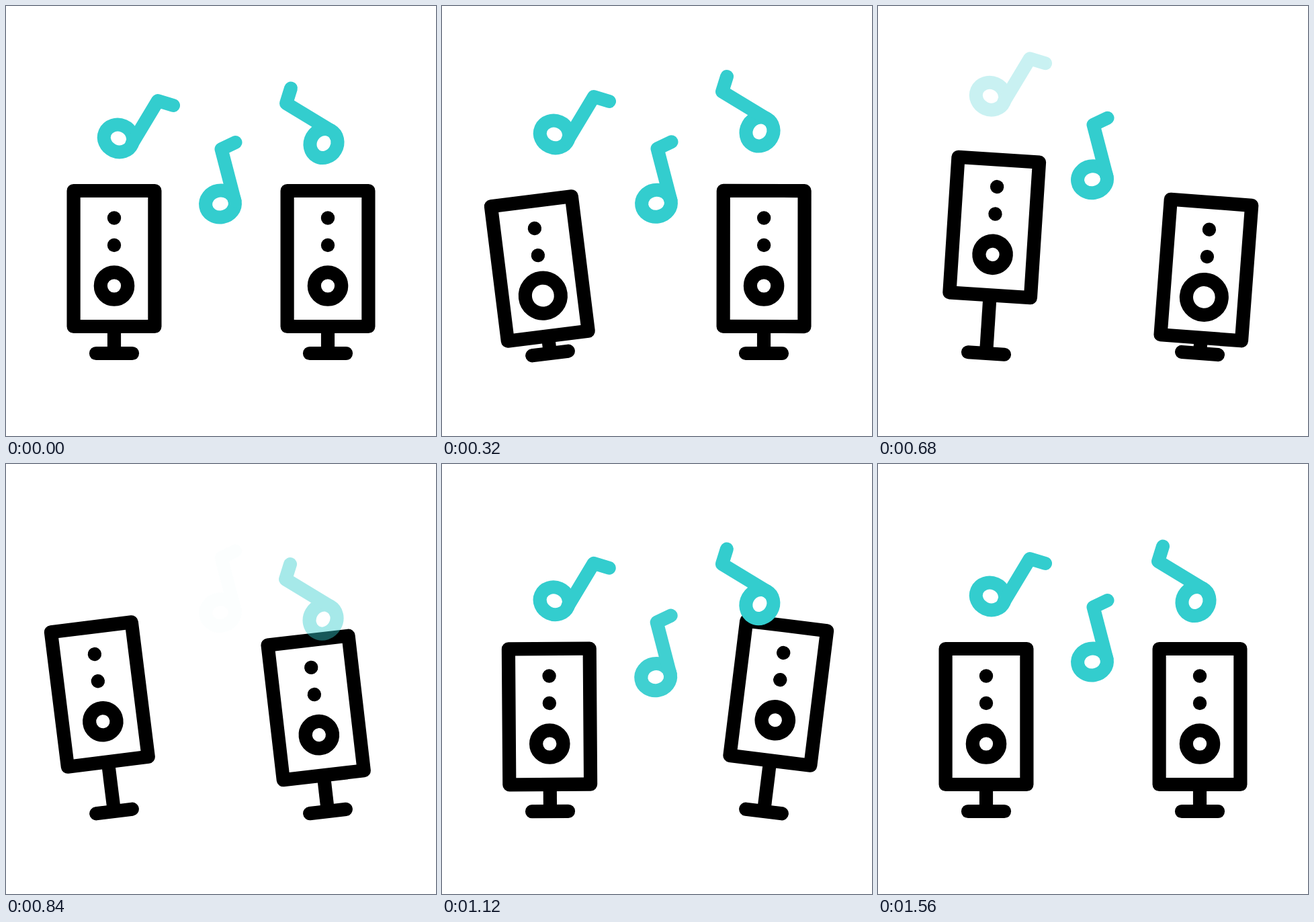
Recreate the animation shown at these times as an HTML page. Size 640x640 px, loop 1600 ms.

```html
<!DOCTYPE html>
<html lang="en">
<head>
<meta charset="utf-8">
<title>Dancing speakers</title>
<style>
  html, body { margin: 0; height: 100%; overflow: hidden; background: #fff; }
  svg { display: block; width: 100vw; height: 100vh; }
  .line { fill: none; stroke: #000; stroke-width: 20.2; stroke-linejoin: round; }
  .note { fill: none; stroke: #33cdce; stroke-width: 20; stroke-linecap: round; stroke-linejoin: round; }
  .note ellipse { fill: #fff; }
</style>
</head>
<body>
<svg viewBox="0 0 640 640">
  <defs>
    <g id="cabinet">
      <rect class="line" x="-60.4" y="-242" width="120.8" height="202"/>
      <circle cy="-201.5" r="10.2"/>
      <circle cy="-161" r="10.2"/>
    </g>
  </defs>
  <g id="stage"></g>
</svg>
<script>
const LOOP = 1600;
const stage = document.getElementById('stage');

// Speaker tracks: [ms, value] keys, eased between neighbours
const TILT = [[20, 0], [255, 7.1], [317, 7.1], [577, -7], [609, -7], [839, 7.1], [892, 7.1], [1160, 0]];
const DROP = [[45, 0], [422, 17], [685, -47], [735, -47], [1045, 0]];
const WOOFER = [[200, 20.2], [355, 27.4], [510, 20.2]];

const speakers = [
  { x: 161, side: -1, delay: 0 },
  { x: 479, side: 1, delay: 290 },
];

// delay: start of the rise; back..end: the return from below, starting "below" px down
const notes = [
  { head: [167.5, 197, 24], stem: 'M187.5 205L226 141L249 148', delay: 120, back: 868, end: 1335, below: 40 },
  { head: [319, 294.5, -10], stem: 'M340.5 290L320.5 213L341.5 203', delay: 240, back: 967, end: 1559, below: 45 },
  { head: [473, 204.5, -60], stem: 'M483 185L417 145L424 122.5', delay: 0, back: 770, end: 1340, below: 36 },
];

const clamp = v => Math.min(1, Math.max(0, v));
const smooth = v => v * v * (3 - 2 * v);

function track(keys, t) {
  let value = keys[0][1];
  for (let i = 1; i < keys.length; i++) {
    const [t0, v0] = keys[i - 1], [t1, v1] = keys[i];
    if (t > t0) value = v0 + (v1 - v0) * smooth(clamp((t - t0) / (t1 - t0)));
  }
  return value;
}

function addGroup(markup) {
  const g = document.createElementNS('http://www.w3.org/2000/svg', 'g');
  g.innerHTML = markup;
  stage.append(g);
  return g;
}

for (const s of speakers) {
  s.el = addGroup(`
    <path class="line" d="M-27 0H27" stroke-linecap="round"/>
    <path class="line stand"/>
    <g class="body"><use href="#cabinet"/><circle class="line woofer" cy="-100.5"/></g>`);
  s.stand = s.el.querySelector('.stand');
  s.body = s.el.querySelector('.body');
  s.woofer = s.el.querySelector('.woofer');
}

for (const n of notes) {
  const [x, y, angle] = n.head;
  n.el = addGroup(`<g class="note">
    <ellipse rx="22" ry="20" transform="translate(${x} ${y}) rotate(${angle})"/>
    <path d="${n.stem}"/></g>`);
}

function poseSpeaker(s, time) {
  const t = time - s.delay;
  const drop = track(DROP, t);
  s.el.setAttribute('transform', `translate(${s.x} 517) rotate(${s.side * track(TILT, t)})`);
  s.stand.setAttribute('d', `M0 0V${drop - 40}`);
  s.body.setAttribute('transform', `translate(0 ${drop})`);
  s.woofer.setAttribute('r', track(WOOFER, t));
}

function poseNote(n, time) {
  let dx = 0, dy, opacity;
  if (time < n.back) {
    const t = Math.max(0, time - n.delay);
    dy = -62.5 * (t / 560) ** 2.28;
    opacity = clamp((602 - t) / 158);
  } else {
    dy = n.below * clamp((n.end - time) / (n.end - n.back)) ** 2.28;
    dx = -dy / 28;
    opacity = clamp((time - n.back) / 165);
  }
  n.el.setAttribute('transform', `translate(${dx} ${dy})`);
  n.el.setAttribute('opacity', opacity);
}

function draw() {
  const time = performance.now() % LOOP;
  speakers.forEach(s => poseSpeaker(s, time));
  notes.forEach(n => poseNote(n, time));
  requestAnimationFrame(draw);
}
draw();
</script>
</body>
</html>
```
